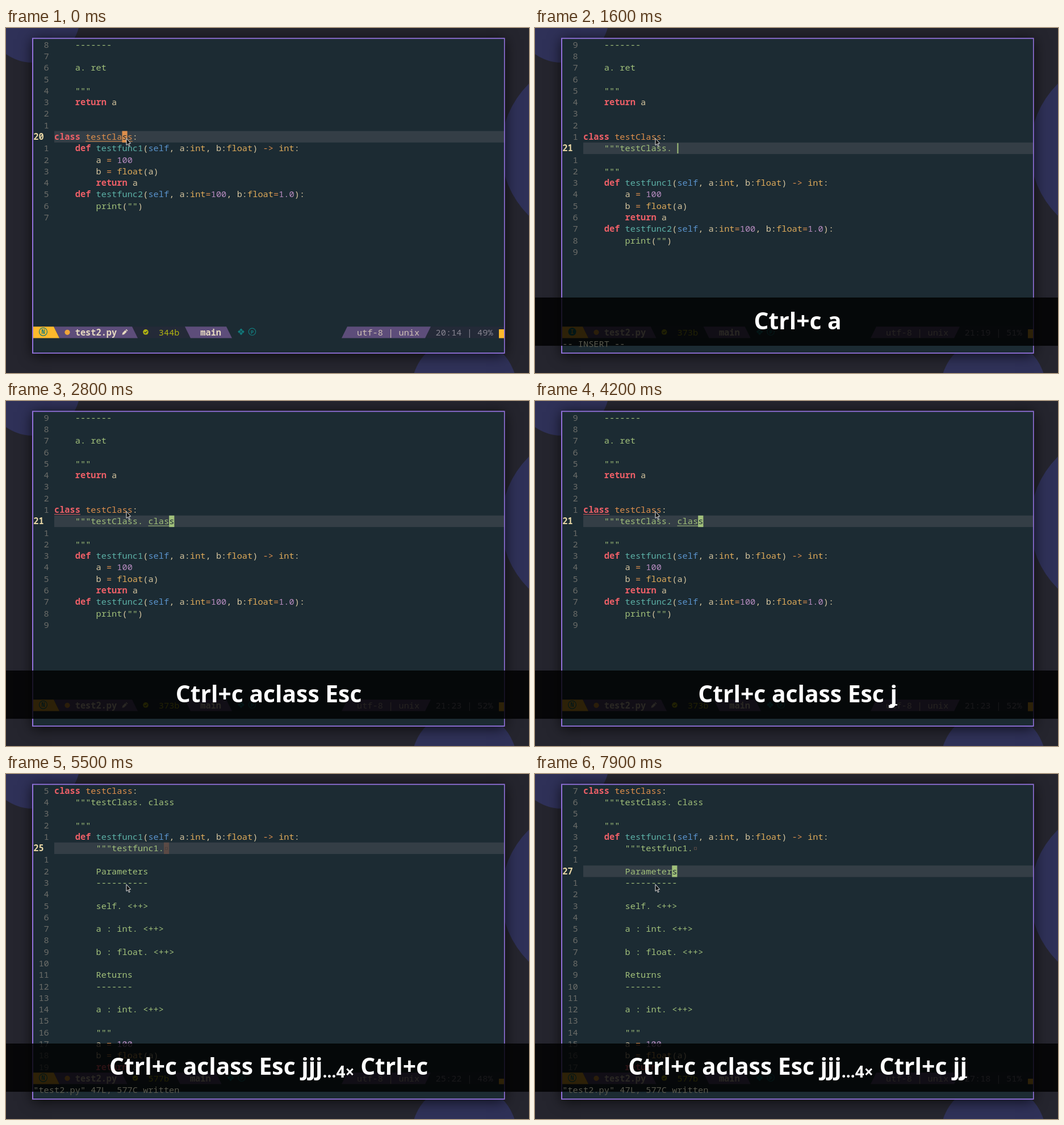
Recreate the animation shown at these times as an HTML page with a canvas. Size 921 by 608 pixels, loop 8000 ms.

```html
<!DOCTYPE html>
<html lang="en">
<head>
<meta charset="utf-8">
<title>Docstring editing</title>
<style>
html, body { margin: 0; width: 100%; height: 100%; overflow: hidden; background: #25252e; }
canvas { display: block; }
</style>
</head>
<body>
<canvas id="stage" width="921" height="608"></canvas>
<script>
const ctx = document.getElementById('stage').getContext('2d');
const LOOP = 8000, CELL = 9.19, ROW = 20.28, LEFT = 85, TOP = 19.3, ASCENT = 15.5;
const MONO = '"Noto Sans Mono", "DejaVu Sans Mono", monospace';
const SANS = '"Noto Sans", "Open Sans", sans-serif';
const C = {
  bg: '#1c2b33', line: '#343e46', fg: '#d4c49e', red: '#ec5f67', orange: '#de8f4c', yellow: '#dfab5a',
  green: '#a1c07a', teal: '#5cb0a6', blue: '#5a93cc', purple: '#b78cc0', num: '#6c6d69',
  mark: '#5b4a45', menu: '#363d47', bar: '#5d4d7a', dark: '#242a38', gold: '#fdb92c',
  icon: '#127a7c', size: '#b0b312', cream: '#e6dac0', dim: '#85838f', msg: '#58584d', blob: '#2f3158'
};

const head = ['    -------', '', '    a. ret', '', '    """', '    return a', '', '', 'class testClass:'];
const def1 = '    def testfunc1(self, a:int, b:float) -> int:';
const body = ['        a = 100', '        b = float(a)', '        return a',
  '    def testfunc2(self, a:int=100, b:float=1.0):', '        print("")', ''];
const doc1 = ['"""testfunc1. ', '', 'Parameters', '----------', '', 'self. <++>', '', 'a : int. <++>', '',
  'b : float. <++>', '', 'Returns', '-------', '', 'a : int. <++>', '', '"""'].map(s => s && '        ' + s);
const snippets = ['cl', 'class', 'cla', 'clai', 'clatin1', 'def(class method)',
  'def(static class method)', 'def(abstract class method)'];

const CLASS_KEYS = 'Ctrl+c aclass', J_KEYS = CLASS_KEYS + ' Esc ', LONG_KEYS = J_KEYS + 'jjj…4× Ctrl+c';
const line21 = [[8, 0, 5, C.red], [9, 18, 5, C.green]];

// Each step changes only the listed fields of the state before it.
const steps = [
  [0, { keys: '', mark: false, doc: null, scrolled: false, row: 8, col: 13, pos: '20:14 | 49%', msg: '',
    insert: false, edited: true, size: '344b', menu: '', under: [[8, 6, 9, C.orange]] }],
  [400, { keys: 'Ctrl+c' }],
  [500, { doc: '', row: 9, col: 17, pos: '21:18 | 51%', under: [] }],
  [600, { edited: false, size: '373b', msg: '"test2.py" 30L, 373C written' }],
  [1400, { keys: 'Ctrl+c a', mark: true, insert: true, col: 18, pos: '21:19 | 51%', msg: '-- INSERT --' }],
  [1600, { mark: false }],
  [1800, { keys: 'Ctrl+c ac', mark: true, doc: 'c', edited: true, col: 19, pos: '21:20 | 52%' }],
  [1900, { keys: 'Ctrl+c acl' }],
  [2000, { doc: 'cl', col: 20, pos: '21:21 | 52%', menu: 'cl' }],
  [2100, { keys: 'Ctrl+c acla', doc: 'cla' }],
  [2200, { keys: CLASS_KEYS, doc: 'clas', col: 22, pos: '21:23 | 52%', menu: 'class' }],
  [2300, { mark: false, doc: 'class', col: 23, pos: '21:24 | 52%' }],
  [2800, { keys: CLASS_KEYS + ' Esc', insert: false, col: 22, pos: '21:23 | 52%', msg: '', menu: '', under: line21 }],
  [4200, { keys: J_KEYS + 'j', mark: true }],
  [4300, { row: 10, col: 0, pos: '22:1  | 55%', under: [] }],
  [4400, { keys: J_KEYS + 'jj', row: 11, pos: '23:1  | 58%' }],
  [4500, { keys: J_KEYS + 'jjj' }],
  [4600, { row: 12, col: 22, pos: '24:23 | 61%' }],
  [4700, { keys: J_KEYS + 'jjj…4×', row: 13, col: 14, pos: '25:15 | 64%' }],
  [4900, { mark: false }],
  [5200, { keys: LONG_KEYS }],
  [5400, { scrolled: true, row: 5, col: 21, pos: '25:22 | 48%' }],
  [5500, { edited: false, size: '577b', msg: '"test2.py" 47L, 577C written' }],
  [7300, { keys: LONG_KEYS + ' j', mark: true, row: 6, col: 0, pos: '26:1  | 50%' }],
  [7500, { mark: false }],
  [7900, { keys: LONG_KEYS + ' jj', mark: true, row: 7, col: 17, pos: '27:18 | 51%' }]
];

const colX = c => LEFT + c * CELL;
const rowY = r => TOP + r * ROW;

function rect(x, y, w, h, color) {
  ctx.fillStyle = color;
  ctx.fillRect(x, y, w, h);
}
function poly(color, ...p) {
  ctx.beginPath();
  for (let i = 0; i < p.length; i += 2) ctx.lineTo(p[i], p[i + 1]);
  ctx.closePath();
  ctx.fillStyle = color;
  ctx.fill();
}
function disc(x, y, r, color, hollow) {
  ctx.beginPath();
  ctx.arc(x, y, r, 0, 7);
  ctx.fillStyle = ctx.strokeStyle = color;
  ctx.lineWidth = 1.2;
  hollow ? ctx.stroke() : ctx.fill();
}
function text(s, x, row, color, bold) {
  ctx.font = (bold ? '700 ' : '400 ') + '15.32px ' + MONO;
  ctx.fillStyle = color;
  ctx.fillText(s, x, rowY(row) + ASCENT);
}
function letter(s, x, y, px, color) {
  ctx.font = `700 ${px}px ${MONO}`;
  ctx.fillStyle = color;
  ctx.textAlign = 'center';
  ctx.fillText(s, x, y);
  ctx.textAlign = 'left';
}

function buffer(s) {
  const lines = [...head];
  if (s.doc !== null) lines.push('    """testClass. ' + s.doc, '', '    """');
  lines.push(def1);
  if (s.scrolled) lines.push(...doc1);
  return lines.concat(body);
}

function colorOf(t) {
  if (/^(class|def|return)$/.test(t)) return C.red;
  if (t === 'testClass' || t === '->' || t === '=') return C.orange;
  if (/^testfunc/.test(t)) return C.teal;
  if (t === 'self') return C.blue;
  if (/^(int|float)$/.test(t)) return C.yellow;
  if (/^\d/.test(t)) return C.purple;
  return t === 'print' || t === '""' ? C.green : C.fg;
}

// Returns [column, text, colour] for every token of a line.
function tokens(line, inDoc) {
  if (inDoc) return [[line.search(/\S|$/), line.trim(), C.green]];
  return [...line.matchAll(/\d+(\.\d+)?|\w+|->|""|[^\s\w]/g)].map(m => [m.index, m[0], colorOf(m[0])]);
}

function drawCursor(s, line, parts) {
  const x = colX(s.col), y = rowY(s.row);
  if (s.insert) return rect(x, y + 1, 2, ROW - 2, C.green);
  const ch = line[s.col];
  const hit = parts.find(p => s.col >= p[0] && s.col < p[0] + p[1].length);
  const blank = ch === ' ';
  rect(x, y, CELL, ROW, blank ? C.mark : hit ? hit[2] : C.fg);
  if (!blank && ch) text(ch, x, s.row, C.bg);
}

function drawCode(s) {
  const top = s.scrolled ? 8 : 0;
  let inDoc = true;
  rect(LEFT, rowY(s.row), 792, ROW, C.line);
  buffer(s).forEach((line, i) => {
    const row = i - top, quote = line.includes('"""'), parts = tokens(line, inDoc || quote);
    if (quote) inDoc = !inDoc;
    if (row < 0 || row > 24) return;
    if (row === s.row) text(String(row + top + 12), 48.2, row, '#e9d8a6', true);
    else text(String(Math.abs(row - s.row)).padStart(2), colX(-3), row, C.num);
    for (const [c, t, color] of parts) text(t, colX(c), row, color, color === C.red);
    if (row === s.row) drawCursor(s, line, parts);
    if (line.endsWith(' ') && !s.insert) {
      ctx.strokeStyle = row === s.row ? '#4a403e' : C.mark;
      ctx.lineWidth = 1;
      ctx.strokeRect(colX(line.length - 1) + 2.5, rowY(row) + 8.5, 4, 4);
    }
  });
  for (const [r, c, n, color] of s.under) rect(colX(c), rowY(r) + 17.7, n * CELL, 1, color);
}

function drawMenu(filter) {
  if (!filter) return;
  const items = snippets.filter(t => t.includes(filter));
  // The shortest filter also keeps every fuzzy match.
  rect(colX(17), rowY(10), 35 * CELL, items.length * ROW, C.menu);
  items.forEach((t, i) => {
    text(t + '~', colX(18), 10 + i, C.fg);
    letter('{}', 513, rowY(10 + i) + 13, 9.5, C.fg);
    text('[S]', colX(48), 10 + i, C.fg);
  });
}

function drawStatus(s) {
  const y = rowY(25), b = y + ROW, mid = y + 10, d = s.edited ? 0 : -2 * CELL;
  // Slanted block; lean is the horizontal offset of its bottom edge.
  const block = (x1, x2, color, lean = 10) => poly(color, x1, y, x2, y, x2 + lean, b, x1 + lean, b);
  rect(200, y, 125 + d, ROW, C.dark);
  rect(738, y, 139, ROW, C.dark);
  block(84, 222 + d, C.bar);
  poly(C.gold, 48, y, 84, y, 94, b, 48, b);
  block(315 + d, 388 + d, C.bar);
  block(601, 748, C.bar, -10);

  disc(65.5, mid - 1, 7, C.icon, !s.insert);
  letter(s.insert ? 'I' : 'N', 65.5, mid + 3, 10, s.insert ? C.gold : C.icon);
  disc(108, mid, 4.6, '#f0a53a');
  text('test2.py', 121.7, 25, C.cream, true);
  if (s.edited) {
    poly(C.cream, 204.5, mid + 4.5, 205.3, mid + 1, 210, mid - 3.7, 212.7, mid - 1, 208, mid + 3.7);
    poly(C.cream, 210.7, mid - 4.4, 212, mid - 5.5, 214.5, mid - 3, 213.4, mid - 1.7);
  }
  disc(246 + d, mid - 0.5, 4.8, C.size);
  ctx.beginPath();
  ctx.moveTo(243.6 + d, mid - 0.5);
  ctx.lineTo(245.4 + d, mid + 1.3);
  ctx.lineTo(248.6 + d, mid - 2);
  ctx.strokeStyle = C.dark;
  ctx.stroke();
  text(s.size, 268.8 + d, 25, C.size);
  text('main', 342.3 + d, 25, C.cream, true);
  for (const [u, v] of [[0, -3.2], [3.2, 0], [0, 3.2], [-3.2, 0]]) {
    const x = 414 + d + u, z = mid - 1 + v;
    poly(C.icon, x, z - 2.7, x + 2.7, z, x, z + 2.7, x - 2.7, z);
  }
  disc(433.5 + d, mid - 1, 6.2, C.icon, true);
  letter('P', 433.5 + d, mid + 2.5, 9, C.icon);
  text('utf-8 | unix', 618, 25, '#cdbfb4');
  text(s.pos, 756.6, 25, C.dim);
  const barTop = s.scrolled ? 537 : 531;
  rect(868, barTop, 9, b - barTop, C.gold);
}

function drawPointer() {
  ctx.beginPath();
  [212, 194.5, 212, 206.5, 214.6, 204.2, 216.4, 208.6, 218.2, 207.8, 216.3, 203.5, 219.6, 203.2]
    .forEach((v, i, p) => i % 2 || ctx.lineTo(v, p[i + 1]));
  ctx.closePath();
  ctx.fillStyle = '#111';
  ctx.fill();
  ctx.strokeStyle = '#e8e8e8';
  ctx.lineWidth = 1;
  ctx.stroke();
}

function drawKeys(s) {
  if (!s.keys) return;
  rect(0, 475, 921, 85, 'rgba(0,0,0,0.82)');
  const parts = s.keys.split(/(…4×)/).filter(Boolean), base = parts.length > 1 ? 530 : 531;
  const isSub = p => p[0] === '…';
  const setFont = p => { ctx.font = `700 ${isSub(p) ? 28 : 40.8}px ${SANS}`; };
  const width = p => { setFont(p); return ctx.measureText(p).width; };
  let x = 462.6 - parts.reduce((sum, p) => sum + width(p), 0) / 2;
  for (const p of parts) {
    const w = width(p);
    ctx.fillStyle = '#fff';
    ctx.fillText(p, x, base + (isSub(p) ? 4.5 : 0));
    x += w;
  }
  if (!s.mark) return;
  const last = parts[parts.length - 1], sub = isSub(last), w = width(sub ? last : last.slice(-1));
  rect(x - w, sub ? 537 : base + 3.2, w, sub ? 2 : 2.4, '#fff');
}

function drawDesktop() {
  rect(0, 0, 921, 608, '#25252e');
  disc(47.7, -22.3, 83.3, C.blob);
  disc(1035, 214.5, 163, C.blob);
  disc(807, 637, 93, C.blob);
  ctx.save();
  ctx.shadowColor = 'rgba(0,0,0,0.7)';
  ctx.shadowBlur = 22;
  ctx.shadowOffsetY = 3;
  rect(46, 17.4, 832.6, 556.4, '#9272dc');
  ctx.restore();
  rect(48, 19.2, 829, 552.8, C.bg);
}

function frame() {
  const t = (performance.now() - start) % LOOP;
  const s = Object.assign({}, ...steps.filter(p => p[0] <= t).map(p => p[1]));
  drawDesktop();
  drawCode(s);
  drawMenu(s.menu === 'cl' ? /cl/.source : s.menu);
  drawStatus(s);
  drawPointer();
  drawKeys(s);
  text(s.msg, 48.2, 26, C.msg);
  requestAnimationFrame(frame);
}
const start = performance.now();
frame();
</script>
</body>
</html>
```
